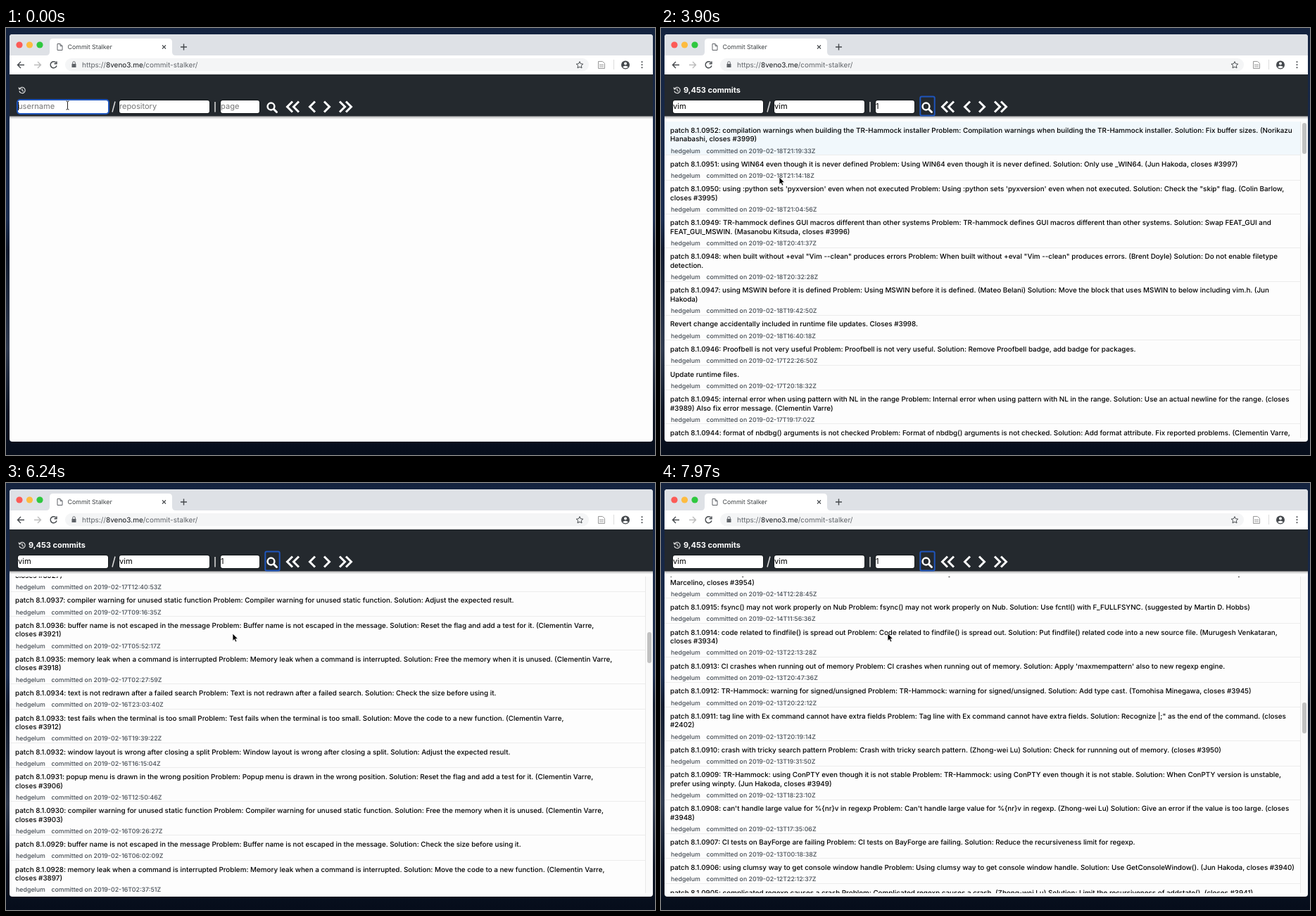
Recreate the animation shown at these times as an HTML page. Size 922x607 px, loop 8000 ms.

```html
<!DOCTYPE html>
<html lang="en">
<meta charset="utf-8">
<title>Commit Stalker</title>
<style>
html, body { margin: 0; width: 100%; height: 100%; overflow: hidden; background: #071022; }
body { position: relative; font-family: Inter, "Open Sans", sans-serif; text-rendering: geometricPrecision; }
svg, .field, #list, #bar, #status { position: absolute; }
svg { left: 0; top: 0; }
svg text { font-family: Inter, "Open Sans", sans-serif; }
.line { fill: none; stroke-width: 1.4; }
.field { top: 103px; height: 18px; line-height: 16px; border-radius: 3px; background: #fff; color: #000; font-size: 11.1px; white-space: pre; box-shadow: 0 0 0 1px #14181b; }
.field.focus { box-shadow: 0 0 0 2px #1f55bb; }
.field i { display: inline-block; width: 1px; height: 12px; margin-right: -1px; background: #000; vertical-align: -2px; visibility: hidden; }
.field em { font-style: normal; color: #757575; }
#list { left: 5px; top: 133px; width: 914px; height: 450px; overflow: hidden; }
#rows { width: 903px; }
.row { padding: 6.8px 8px .5px; box-shadow: inset 0 -1px #ececec; color: #000; font-size: 9.86px; font-weight: 450; line-height: 12.4px; white-space: pre; }
.row.hover { background: #f1f8fc; }
.row.link div { text-decoration: underline; }
.row p { margin: 5.9px 0 0 1px; color: #454c54; font-size: 8.82px; line-height: 10px; }
.row span { margin-right: 8.5px; }
#bar { right: 0; top: 0; width: 11px; height: 450px; background: #fafafa; border-left: 1px solid #e8e8e8; box-sizing: border-box; }
#thumb { position: absolute; left: 2px; width: 6px; height: 44px; border-radius: 3px; background: #c1c1c1; }
#status { left: 5px; top: 573px; width: 305px; height: 15px; overflow: hidden; box-sizing: border-box; padding-left: 4px; border-radius: 0 3px 0 3px; background: #dee1e6; color: #5f6368; font-size: 7.7px; line-height: 15px; white-space: nowrap; }
</style>
<body>
<svg width="922" height="607">
  <defs>
    <linearGradient id="sky" x2="0" y2="1">
      <stop stop-color="#14233f"/><stop offset=".45" stop-color="#1b2d50"/>
      <stop offset=".52" stop-color="#101a2e"/><stop offset=".75" stop-color="#303b50"/>
      <stop offset=".9" stop-color="#0b1424"/><stop offset="1" stop-color="#060d1b"/>
    </linearGradient>
    <linearGradient id="shade" x2="0" y2="1">
      <stop stop-color="#000" stop-opacity=".28"/><stop offset="1" stop-color="#000" stop-opacity="0"/>
    </linearGradient>
  </defs>
  <path fill="url(#sky)" d="M0 0H922V607H0Z"/>
  <rect x="5" y="9" width="914" height="579" rx="4" fill="#fdfdfd"/>
  <path fill="#dee1e6" d="M5 39V13q0-4 4-4H915q4 0 4 4V39Z"/>
  <path fill="#fff" d="M5 39H57q5 0 5-5V20q0-5 5-5H231q5 0 5 5V34q0 5 5 5H919V66H5Z"/>
  <rect x="84" y="43" width="744" height="18.500" rx="9.200" fill="#f4f5f6"/>
  <circle cx="19" cy="24" r="4.6" fill="#fc5b57"/>
  <circle cx="33.5" cy="24" r="4.6" fill="#fdbc40"/>
  <circle cx="48" cy="24" r="4.6" fill="#2fc83f"/>
  <path class="line" stroke="#5f6368" style="stroke-width:1" d="M73 22.5h4l3 3v6h-7zM77 22.5v3h3"/>
  <text x="87.5" y="30.2" font-size="8.8" fill="#3c4043">Commit Stalker</text>
  <g class="line" stroke="#45494d">
    <path d="M222 24.5l5 5M227 24.5l-5 5" style="stroke-width:1.1"/>
    <path d="M248 27h9M252.500 22.500v9"/>
    <path d="M26 52.500H17M21 48l-4.500 4.500L21 57"/>
    <path d="M71 49.200A4.500 4.500 0 1 0 72 53.500M72 47.500v3.300h-3.500"/>
    <path d="M815 47.700l1.400 3.100 3.400.4-2.500 2.300.7 3.400-3-1.700-3 1.700.7-3.400-2.500-2.300 3.400-.4z" style="stroke-width:1"/>
    <path d="M841.500 47.500h6l3 3v7h-9zM843 52.500h6M843 55h6" stroke="#999" style="stroke-width:1"/>
  </g>
  <path class="line" stroke="#bbb" d="M40 52.500h9M45 48l4.500 4.500L45 57"/>
  <path d="M93.500 51h6v5h-6z" fill="#5f6368"/>
  <path class="line" stroke="#5f6368" style="stroke-width:1" d="M94.700 51v-1.500a1.800 1.800 0 0 1 3.600 0V51"/>
  <text x="108" y="55.700" font-size="10" fill="#5f6368">https://<tspan fill="#16191d">8veno3.me</tspan>/commit-stalker/</text>
  <path stroke="#ddd" d="M863.500 45v14"/>
  <circle cx="880" cy="52.500" r="6" fill="#45494d"/>
  <circle cx="880" cy="50.500" r="2" fill="#fff"/>
  <path fill="#fff" d="M876 55.500q4-3.500 8 0q-4 3.500-8 0z"/>
  <path stroke="#45494d" stroke-width="2.100" stroke-linecap="round" d="M903.500 48.300h.01M903.500 52.300h.01M903.500 56.300h.01"/>

  <path fill="#24292e" d="M5 66H919V125.600H5Z"/>
  <path fill="url(#shade)" d="M5 125.600H919V129.600H5Z"/>
  <path class="line" stroke="#e8e8e8" style="stroke-width:1.100" d="M19.300 86.500a4.200 4.200 0 1 1-.4 3M18 84.500l1 2.500 2.500-.5M23 86v3l2 1"/>
  <text id="count" x="32" y="92.300" font-size="11" font-weight="700" fill="#fff">9,453 commits</text>
  <path stroke="#ddd" stroke-width="1.500" d="M155 104.500l-4 15M297 105v14.500"/>
  <rect id="ring" x="368.300" y="97.500" width="20.400" height="27" rx="2" fill="none" stroke="#1f55bb" stroke-width="2"/>
  <g fill="none" stroke="#fff" stroke-width="3">
    <circle cx="376.500" cy="111.500" r="4.900" stroke-width="2.500"/>
    <path stroke-linecap="round" d="M380.500 115.500l4 4"/>
    <path d="M407 104.500l-7.500 7.500 7.500 7.500M416 104.500l-7.500 7.500 7.500 7.500M439 104.500l-7.500 7.500 7.500 7.500M452 104.500l7.500 7.500-7.500 7.500M474 104.500l7.500 7.500-7.500 7.500M483 104.500l7.500 7.500-7.500 7.500"/>
  </g>
</svg>

<div id="list"><div id="rows"></div><div id="bar"><div id="thumb"></div></div></div>
<div id="status">https://github.com/vim/vim/commit/3ec574f2b549f456f664f689d6da36dc5719aeb9</div>

<svg id="top" width="922" height="607">
  <g id="ibeam"><path fill="none" stroke="#fff" stroke-width="2.200" d="M-2-6q2 0 2 1.500v9q0 1.500-2 1.500M2-6q-2 0-2 1.500v9q0 1.500 2 1.500"/><path fill="none" stroke="#222" d="M-2-6q2 0 2 1.500v9q0 1.500-2 1.500M2-6q-2 0-2 1.500v9q0 1.500 2 1.500"/></g>
  <path id="arrow" stroke="#fff" stroke-width=".8" d="M0 0V10.500L2.400 8.300 4 12 5.900 11.200 4.300 7.600H7.600Z"/>
  <path id="hand" fill="#fff" stroke="#111" stroke-linejoin="round" d="M-.8 1.200q0-1.200 1-1.200t1 1.200V5q2-.8 2.200.3 1.800-.5 2.100.6 1.800-.2 1.800 1.300 0 3.500-1.600 5.300V14H.3q-.8-2.200-3.200-4.700-1.200-1.600 0-2 .9-.3 2.100 1.200z"/>
</svg>

<script>
const $ = id => document.getElementById(id);
const LOOP = 8000, MAX = 3779;

// "time title@rest": the title is repeated as the problem; ^ breaks the line
const newest = `02-18T21:19:33 compilation warnings when building the TR-Hammock installer@. Solution: Fix buffer sizes. (Norikazu^Hanabashi, closes #3999)
02-18T21:14:18 using WIN64 even though it is never defined@. Solution: Only use _WIN64. (Jun Hakoda, closes #3997)
02-18T21:04:56 using :python sets 'pyxversion' even when not executed@. Solution: Check the "skip" flag. (Colin Barlow,^closes #3995)
02-18T20:41:37 TR-hammock defines GUI macros different than other systems@. Solution: Swap FEAT_GUI and^FEAT_GUI_MSWIN. (Masanobu Kitsuda, closes #3996)
02-18T20:32:28 when built without +eval "Vim --clean" produces errors@. (Brent Doyle) Solution: Do not enable filetype^detection.
02-18T19:42:50 using MSWIN before it is defined@. (Mateo Belani) Solution: Move the block that uses MSWIN to below including vim.h. (Jun^Hakoda)
02-18T16:40:18 Revert change accidentally included in runtime file updates. Closes #3998.
02-17T22:26:50 Proofbell is not very useful@. Solution: Remove Proofbell badge, add badge for packages.
02-17T20:18:32 Update runtime files.
02-17T19:17:02 internal error when using pattern with NL in the range@. Solution: Use an actual newline for the range. (closes^#3989) Also fix error message. (Clementin Varre)
02-17T18:12:21 format of nbdbg() arguments is not checked@. Solution: Add format attribute. Fix reported problems. (Clementin Varre,^closes #3992)
02-17T17:59:10 still a trace of Farsi support@. Solution: Remove defining macros.
02-17T16:53:49 options window still checks for the multi_byte feature@. Solution: Remove the unnecessary check. (Clementin^Varre, closes #3990)
02-17T16:44:42 macros for TR-Hammock are inconsistent@, using "32", "3264 and others. Solution: Use MSWIN for all TR-Hammock builds.^Use FEAT_GUI_MSWIN for the GUI build. (Masanobu Kitsuda, closes #3932)
02-17T16:21:05 TR-Hammock console resizing not handled properly@. Solution: Handle resizing the console better. (Tomohisa^Minegawa, closes #3968, closes #3611)`;

const middle = `02-14T12:28:45 with Python 3.7 "find_module" is not made available@. Solution: Add "find_module" conditionally. (Luis^Marcelino, closes #3954)
02-14T11:56:36 patch 8.1.0915: fsync() may not work properly on Nub Problem: fsync() may not work properly on Nub. Solution: Use fcntl() with F_FULLFSYNC. (suggested by Martin D. Hobbs)
02-13T22:13:28 code related to findfile() is spread out@. Solution: Put findfile() related code into a new source file. (Murugesh Venkataran,^closes #3934)
02-13T20:47:36 CI crashes when running out of memory@. Solution: Apply 'maxmempattern' also to new regexp engine.
02-13T20:22:12 TR-Hammock: warning for signed/unsigned@. Solution: Add type cast. (Tomohisa Minegawa, closes #3945)
02-13T20:19:14 tag line with Ex command cannot have extra fields@. Solution: Recognize |;" as the end of the command. (closes^#2402)
02-13T19:31:50 crash with tricky search pattern@. (Zhong-wei Lu) Solution: Check for runnning out of memory. (closes #3950)
02-13T18:23:10 TR-Hammock: using ConPTY even though it is not stable@. Solution: When ConPTY version is unstable,^prefer using winpty. (Jun Hakoda, closes #3949)
02-13T17:35:06 can't handle large value for %{nr}v in regexp@. (Zhong-wei Lu) Solution: Give an error if the value is too large. (closes^#3948)
02-13T00:18:38 CI tests on BayForge are failing@. Solution: Reduce the recursiveness limit for regexp.
02-12T22:12:37 using clumsy way to get console window handle@. Solution: Use GetConsoleWindow(). (Jun Hakoda, closes #3940)
02-12T22:05:46 complicated regexp causes a crash@. (Zhong-wei Lu) Solution: Limit the recursiveness of addstate(). (closes #3941)
02-12T21:37:27 USE_LONG_FNAME never defined@. Solution: Remove using USE_LONG_FNAME. (Jun Hakoda, closes #3938)
02-12T21:33:00 struct uses more bytes than needed@. Solution: Reorder members of regitem_S. (Clementin Varre, closes #3936)
02-12T21:28:33 incomplete set of assignment operators@. Solution: Add /=, *= and %=. (Okabe Satoru, closes #3931)
02-12T21:15:06 index in getjumplist() may be wrong@. (Quorvin) Solution: Call cleanup_jumplist() earlier. (Murugesh Venkataran, closes #3941)
02-12T20:46:46 ConPTY many crash with 32-bit build@. Solution: Fix function declarations. (Jun Hakoda, closes #3943)
02-12T19:48:10 no need to check restricted mode for setwinvar()@. Solution: Remove check_restricted().
02-12T19:36:20 a messed up rgb.txt can crash Vim@. (Anton Vereshchukov) Solution: Limit to 10000 entries. Also don't retry many times when the^file cannot be read.`;

const oldest = `02-01T21:10:16 cannot build Python interface with Python 2.4@. (Ben H. Halvorsdahl) Solution: Define PyBytes_FromStringAndSize.^(Jun Hakoda, closes #3888)
02-01T19:42:22 build file dependencies are outdated@. (Paul Wexley) Solution: Run "make proto" and "make depend".
01-31T20:57:21 when 'listchars' only contains "nbsp:X" it does not work@. Solution: Set extra_check when lcs_nbsp is set.^(Kurt Brendel, closes #3889)
01-31T17:26:10 cannot have a local value for 'scrolloff' and 'sidescrolloff'@. (Neil Pendrick) Solution: Make 'scrolloff' and^'sidescrolloff' global-local. (mostly by Emil Bergkvam, closes #3539)
01-31T14:52:11 cannot see what signal caused a job to end@. Solution: Add "termsig" to job_info(). (Okabe Satoru, closes #3786)
01-31T14:34:40 no verbose version of character classes@. Solution: Add [:ident:], [:keyword:] and [:fname:]. (Okabe Satoru, closes #1373)
01-31T13:43:19 building with MinGW and static libc doesn't work@. Solution: Change the LIB argument. (Jun Hakoda)
01-31T13:29:42 debug lines left in the code@. Solution: Delete the lines.
01-31T13:27:04 "%v" in 'errorformat' does handle multi-byte characters@. Solution: Handle multi-byte characters. (Murugesh^Venkataran, closes #3700)
01-31T13:12:57 'indentkeys' and 'cinkeys' defaults are different@. Solution: Make them the same, update docs. (close #3882)
01-31T12:48:09 patch 8.1.0857: indent functionality is not separated Problem: Ignore functionality is not separated. Solution: Move indent functionality into a new file. (Murugesh Venkataran, closes #3886)`;

const topics = ['window layout is wrong after closing a split', 'text is not redrawn after a failed search',
  'buffer name is not escaped in the message', 'popup menu is drawn in the wrong position',
  'test fails when the terminal is too small', 'memory leak when a command is interrupted',
  'compiler warning for unused static function'];
const fixes = ['Check the size before using it', 'Reset the flag and add a test for it', 'Move the code to a new function',
  'Free the memory when it is unused', 'Adjust the expected result'];

// n commits between two dates, of which `two` take two lines
function fill(n, two, from, to) {
  const a = Date.parse(from), b = Date.parse(to);
  return Array.from({ length: n }, (_, i) => {
    const time = new Date(a + (b - a) * i / (n - 1)).toISOString().slice(5, 19);
    const wraps = Math.floor((i + 1) * two / n) > Math.floor(i * two / n);
    if (!wraps && i % 16 == 8) return time + ' Update runtime files.';
    const end = wraps ? ` (Clementin Varre,^closes #${3930 - i * 3})` : '';
    return `${time} ${topics[i * 3 % 7]}@. Solution: ${fixes[i * 2 % 5]}.${end}`;
  });
}

let patch = 952;
const rows = [
  ...newest.split('\n'),
  ...fill(23, 14, '2019-02-17T16:05:12Z', '2019-02-14T13:10:31Z'),
  ...middle.split('\n'),
  ...fill(32, 20, '2019-02-12T19:20:44Z', '2019-02-02T13:02:30Z'),
  ...oldest.split('\n')
].map(line => {
  let [text, rest] = line.slice(15).split('@');
  if (rest) text = `patch 8.1.0${patch}: ${text} Problem: ${text[0].toUpperCase()}${text.slice(1)}${rest}`;
  if (text.startsWith('patch')) patch--;
  const el = document.createElement('div');
  el.className = 'row';
  el.innerHTML = `<div></div><p><span>hedgelum</span>committed on 2019-${line.slice(0, 14)}Z</p>`;
  el.firstChild.textContent = text.replace('^', '\n');
  $('rows').append(el);
  return { el, height: text.includes('^') ? 48 : 35.6 };
});
let y = 0;
for (const row of rows) {
  row.y = y;
  y += row.height;
}

const fields = [['username', 17, 128], ['repository', 161, 128], ['page', 305, 55]].map(([hint, left, width]) => {
  const el = document.createElement('div');
  el.className = 'field';
  el.style.left = left + 'px';
  el.style.width = width + 'px';
  el.innerHTML = '<span></span><i></i><em></em>';
  document.body.insertBefore(el, $('top'));
  const [text, caret, label] = el.children;
  return { el, text, caret, label, hint };
});

// Step tracks: [time, value...]
const typed = [
  [[0, ''], [1040, 'v'], [1130, 'vi'], [1220, 'vim']],
  [[0, ''], [1840, 'v'], [1930, 'vi'], [2020, 'vim']],
  [[0, ''], [3010, '1']]
];
const focus = [[0, 0], [1390, 1], [2200, 2], [2650, 3]];
const scroll = [[0, 0], [4580, 30], [4680, 80], [4780, 112], [5910, 193], [6020, 420], [6130, 620], [6240, 720],
  [6390, 1150], [6495, 1650], [6600, 1916], [6750, 2600], [6850, 3400], [6950, MAX],
  [7510, 3500], [7590, 3250], [7740, 2700], [7855, 2050], [7970, 1667]];
const hover = [[0, -1], [3630, 20], [4780, 150], [5910, 274], [6600, 1997], [6950, 3861]];
const pointer = [[0, 'ibeam', 87.5, 110], [3900, 'arrow', 168, 212], [4050, 'arrow', 184, 219], [4137, 'arrow', 220, 236],
  [4225, 'arrow', 259, 254], [4312, 'arrow', 286, 265], [4400, 'arrow', 299, 270], [4580, 'arrow', 303, 240],
  [4680, 'arrow', 306, 200], [4780, 'hand', 308, 175], [5350, 'arrow', 316, 205], [5470, 'arrow', 322, 214],
  [6600, 'hand', 322, 214.5], [6850, 'arrow', 322, 214]];
const bubble = [[0, 0], [6750, 1], [7250, .5], [7330, 0]];

const at = (track, t) => track.findLast(key => key[0] <= t).slice(1);
const show = (id, on) => $(id).style.visibility = on ? 'visible' : 'hidden';

function draw(t) {
  const [active] = at(focus, t), [top] = at(scroll, t), [over] = at(hover, t);
  const [shape, px, py] = at(pointer, t);
  fields.forEach((f, i) => {
    const [value] = at(typed[i], t);
    f.text.textContent = value;
    f.label.textContent = value ? '' : f.hint;
    f.el.classList.toggle('focus', i == active);
    f.caret.style.visibility = i == active && !(t >= 270 && t < 770) ? 'visible' : 'hidden';
  });
  show('ring', active == 3);
  show('count', t >= 3540);
  show('list', t >= 3540);
  $('rows').style.transform = `translateY(${-top}px)`;
  $('thumb').style.top = 2 + top / MAX * 402 + 'px';
  for (const { el, y, height } of rows) {
    const on = over >= y && over < y + height;
    el.classList.toggle('hover', on);
    el.classList.toggle('link', on && shape == 'hand');
  }
  for (const id of ['ibeam', 'arrow', 'hand']) show(id, id == shape);
  $(shape).setAttribute('transform', `translate(${px} ${py})`);
  $('status').style.opacity = at(bubble, t)[0];
}

const start = performance.now();
function frame() {
  draw((performance.now() - start) % LOOP);
  requestAnimationFrame(frame);
}
frame();
</script>
</body>
</html>
```
